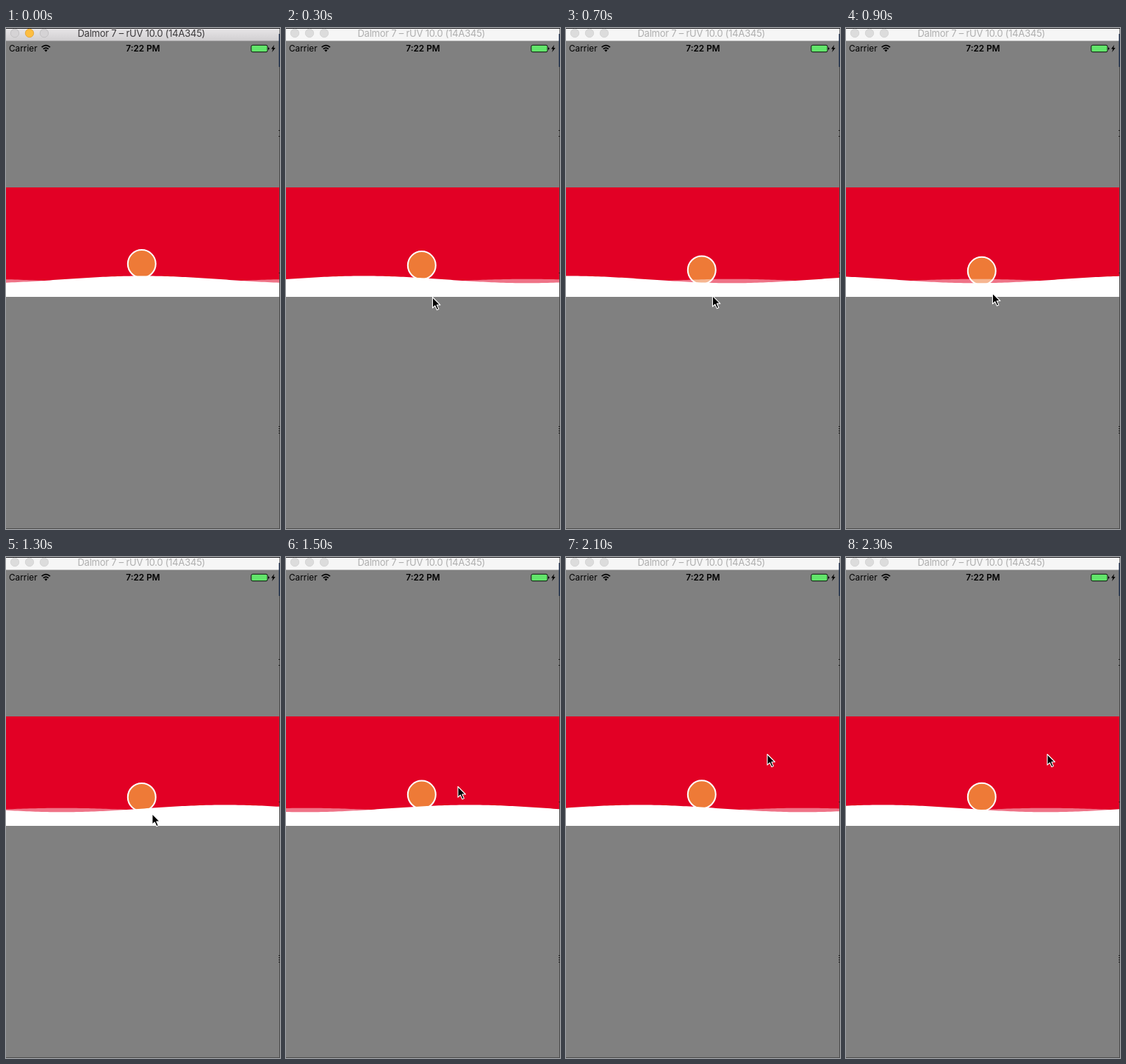
An HTML page that plays this animation: 373 px wide and 682 px high, repeating every 2.4 s.

```html
<!DOCTYPE html>
<html lang="en">
<head>
<meta charset="utf-8">
<title>Wave header</title>
<style>
  html, body { margin: 0; width: 100%; height: 100%; overflow: hidden; background: #808080; }
  svg { display: block; width: 373px; height: 682px; }
  text { font-family: Inter, "Liberation Sans", sans-serif; }
  .title { font-size: 13px; letter-spacing: -.25px; text-anchor: middle; fill: #3c3a3c; }
  .status { font-size: 11.8px; }
  .light { fill: #d5d3d5; stroke: #bdbbbd; stroke-width: .8; }
  .light.mid { fill: #fdbe41; stroke: #e0a02f; }
  .idle .title { fill: #afafaf; }
  .idle .light { fill: #dcdcdc; stroke: #d0d0d0; }
  .idle .bar { fill: #f6f6f6; }
</style>
</head>
<body>
<svg viewBox="0 0 373 682">
  <defs>
    <linearGradient id="chrome" x2="0" y2="1">
      <stop stop-color="#e9e7e9"/>
      <stop offset="1" stop-color="#d0ced0"/>
    </linearGradient>
  </defs>

  <rect width="373" height="682" fill="#808080"/>

  <g id="window">
    <rect class="bar" width="372" height="17.5" fill="url(#chrome)"/>
    <rect width="373" height="1" fill="#1b1b1f"/>
    <circle class="light" cx="12" cy="7" r="5.7"/>
    <circle class="light mid" cx="32" cy="7" r="5.7"/>
    <circle class="light" cx="52" cy="7" r="5.7"/>
    <text class="title" x="184.3" y="11.8">Dalmor 7 – rUV 10.0 (14A345)</text>
  </g>

  <!-- status bar -->
  <text class="status" x="4" y="32">Carrier</text>
  <text class="status" x="186.5" y="32" text-anchor="middle" font-weight="600">7:22 PM</text>
  <g fill="none" stroke="#000" stroke-width="1.8">
    <path d="M48.6 26.2Q54.3 21 60 26.2"/>
    <path d="M50.8 28.7Q54.3 25.5 57.8 28.7"/>
  </g>
  <path d="M52.3 30.2Q54.3 28.5 56.3 30.2L54.3 32.4Z"/>
  <rect x="333.8" y="23.3" width="22.2" height="9.4" rx="2" fill="#62e56b" stroke="#000" stroke-width=".9"/>
  <path d="M357 26.2Q358.5 26.7 358.5 28T357 29.8Z"/>
  <path d="M365.2 23L361 28.6H363.4L362 33L366.7 27.1H364.2Z"/>

  <!-- wave header -->
  <rect y="217" width="372" height="149" fill="#e20025"/>
  <circle id="ball" cx="184.8" r="19" fill="#ee7a37" stroke="#fff" stroke-width="2"/>
  <path id="back" fill="#fff" fill-opacity=".45"/>
  <path id="front" fill="#fff"/>

  <!-- desktop slivers around the window -->
  <rect x="372" y="17" width="1" height="665" fill="#4a4a4a"/>
  <rect x="371.5" y="8" width="1.5" height="45" fill="#1c2c47"/>
  <path d="M371 139.5h2M371 147.5h2M371.5 333.5h1.5M371 542.5h2M371 545.5h2M371 548.5h2M371 551.5h2" stroke="#222"/>
  <rect y="681" width="373" height="1" fill="#4c4c4c"/>

  <path id="cursor" d="M0 0V14.6L3.4 11.5L6 17.2L8.4 16.1L5.9 10.5H10.4Z"
        fill="#000" stroke="#fff" stroke-width="1.1" stroke-linejoin="round"/>
</svg>
<script>
const LOOP = 2400, STEP = 100;
const WIDTH = 372, BASE = 366, WAVELENGTH = 445;

// [time, x of the front wave's trough]
const TROUGH = [[0, 408], [500, 275.5], [2300, -172]];
// [time, x, y]
const POINTER = [
  [100, 199.5, 366.5], [600, 199.5, 366.5], [900, 199.5, 361],
  [1200, 199, 349.5], [1300, 199, 349.5], [1500, 234, 312.5], [1800, 274, 268.5]
];

const byId = id => document.getElementById(id);

function track(keys, t) {
  const i = keys.findIndex(k => k[0] > t);
  if (i < 0) return keys[keys.length - 1].slice(1);
  if (i === 0) return keys[0].slice(1);
  const a = keys[i - 1], b = keys[i];
  const p = (t - a[0]) / (b[0] - a[0]);
  return a.slice(1).map((v, n) => v + (b[n + 1] - v) * p);
}

function wave(mid, height, trough) {
  return x => mid + height * Math.cos((x - trough) * 2 * Math.PI / WAVELENGTH);
}

function fillBelow(curve) {
  let d = `M0 ${BASE}`;
  for (let x = 0; x <= WIDTH; x += 4) d += `L${x} ${curve(x).toFixed(2)}`;
  return `${d}V${BASE}Z`;
}

function draw(t) {
  const [trough] = track(TROUGH, t);
  const front = wave(342.4, 4.9, trough);
  const back = wave(345.1, -3.4, trough);
  byId("front").setAttribute("d", fillBelow(front));
  byId("back").setAttribute("d", fillBelow(back));
  byId("ball").setAttribute("cy", front(173) - 16.5);

  const idle = t >= 100;
  byId("window").classList.toggle("idle", idle);
  const cursor = byId("cursor");
  cursor.style.display = idle ? "" : "none";
  cursor.setAttribute("transform", `translate(${track(POINTER, t)})`);
}

const start = performance.now();
function tick() {
  const t = (performance.now() - start) % LOOP;
  draw(Math.floor(t / STEP) * STEP);
  requestAnimationFrame(tick);
}
tick();
</script>
</body>
</html>
```
